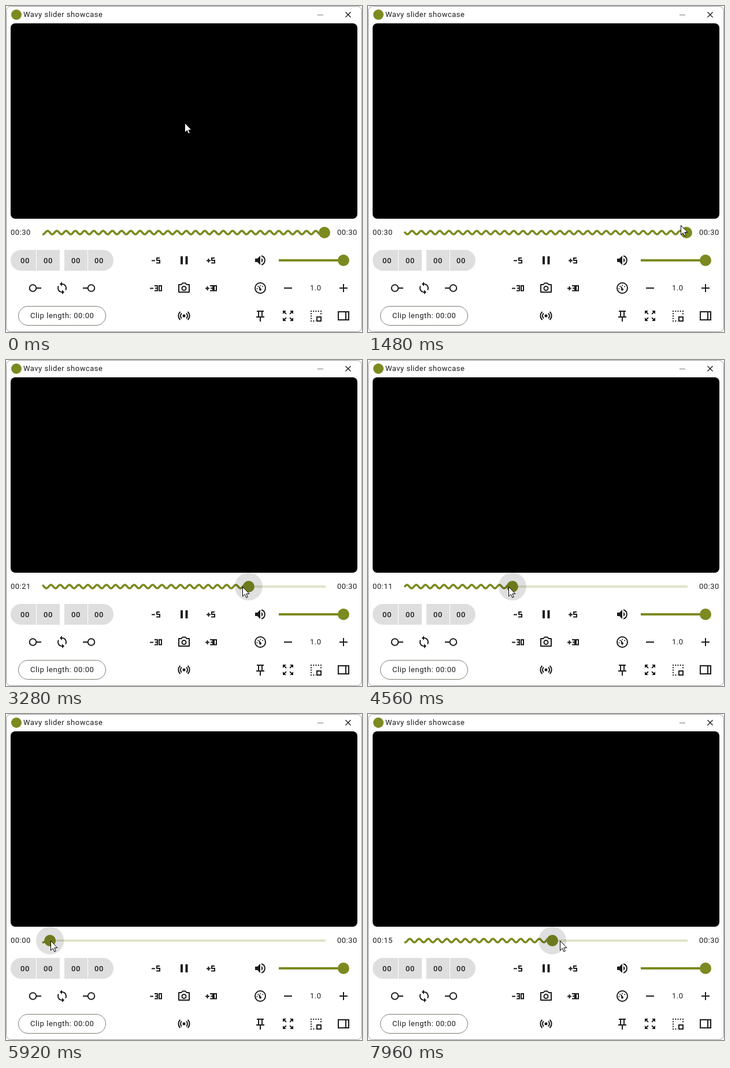
Recreate the animation shown at these times as an HTML page. Size 616 by 564 pixels, loop 8000 ms.

```html
<!DOCTYPE html>
<html lang="en">
<head>
<meta charset="utf-8">
<title>Wavy slider showcase</title>
<style>
  html, body { margin: 0; width: 100%; height: 100%; overflow: hidden; background: #fff; }
  svg { display: block; }
  text { font: 13px Roboto, sans-serif; letter-spacing: .5px; fill: #1c1c1c; }
  .chips { font-weight: 500; }
  .line { fill: none; stroke: #1c1c1c; stroke-width: 2; }
  .solid { fill: #1c1c1c; }
  .olive { fill: #7c8a20; }
  .track { fill: none; stroke: #7c8a20; stroke-width: 4; }
</style>
</head>
<body>
<svg width="616" height="564" viewBox="0 0 616 564">
  <defs>
    <path id="five" d="M6 1H1V5H6V9.5H0"/>
    <path id="three" d="M0 1H5V9.5H0M1 5.2H5"/>
    <path id="zero" d="M1 1H5V9.5H1Z"/>
    <path id="corner" class="solid" d="M3-9l2.3 2.3-2.9 2.9 1.4 1.4 2.9-2.9L9-3V-9z"/>
  </defs>

  <rect x=".5" y=".5" width="615" height="563" rx="8" fill="#fff" stroke="#9c9c9c"/>
  <circle class="olive" cx="18" cy="15" r="9"/>
  <text x="30" y="19">Wavy slider showcase</text>
  <path d="M539 15.5h10" stroke="#777"/>
  <path d="M587.5 10.5l9 9m0-9l-9 9" stroke="#111" stroke-width="1.3"/>
  <rect x="8" y="30" width="600" height="338" rx="8"/>

  <!-- Seek bar -->
  <text id="elapsed" x="8" y="396"></text>
  <text x="573" y="396">00:30</text>
  <path id="rest" class="track" stroke-opacity=".24"/>
  <path id="wave" class="track" style="stroke-width:3.6"/>
  <circle id="thumb" class="olive" cy="392" r="10"/>
  <circle id="halo" cy="392" r="24"/>

  <!-- Clip controls -->
  <path fill="#dedede" d="M93 422H26a18 18 0 0 0 0 36H93zM101 422h67a18 18 0 0 1 0 36H101z"/>
  <path d="M52.5 422v36M141.5 422v36" stroke="#fff"/>
  <g>
    <text class="chips" x="25" y="444.500">00</text>
    <text class="chips" x="65" y="444.500">00</text>
    <text class="chips" x="113" y="444.500">00</text>
    <text class="chips" x="153" y="444.500">00</text>
  </g>
  <g class="line">
    <circle cx="46.500" cy="488" r="5.800"/><path d="M52 488h9"/>
    <circle cx="147.500" cy="488" r="5.800"/><path d="M133 488h9"/>
  </g>
  <path class="solid" transform="translate(85 476)" d="M12 4V1L8 5l4 4V6c3.310 0 6 2.690 6 6 0 1.010-.25 1.970-.7 2.800l1.460 1.460C19.540 15.030 20 13.570 20 12c0-4.420-3.580-8-8-8zm0 14c-3.310 0-6-2.690-6-6 0-1.010.25-1.970.7-2.800L5.240 7.740C4.460 8.970 4 10.430 4 12c0 4.420 3.580 8 8 8v3l4-4-4-4v3z"/>
  <rect x="21.500" y="519.500" width="151" height="33" rx="16.500" fill="none" stroke="#7b7b72"/>
  <text x="42" y="540" style="letter-spacing:.58px">Clip length: 00:00</text>

  <!-- Playback controls -->
  <g class="line">
    <path d="M252 440.500h6M347 440.500h7M350.500 437v7M249 488.500h6M345 488.500h7M348.500 485v7"/>
    <use href="#five" x="260" y="435"/><use href="#five" x="355" y="435"/>
    <use href="#three" x="257" y="483"/><use href="#zero" x="264" y="483"/>
    <use href="#three" x="353" y="483"/><use href="#zero" x="359" y="483"/>
    <path d="M299 482h4.500l2-2.500h5l2 2.500h4.500V495H299z" stroke-linejoin="round"/>
    <circle cx="308" cy="488.500" r="3.500"/>
    <path d="M304 531.500a6 6 0 0 0 0 9M312 531.500a6 6 0 0 1 0 9M301.500 529a9.500 9.500 0 0 0 0 14M314.500 529a9.500 9.500 0 0 1 0 14"/>
  </g>
  <path class="solid" d="M302 433h4v14h-4zM310.500 433h4v14h-4z"/>
  <circle class="solid" cx="308" cy="536" r="2.500"/>

  <!-- Volume and speed -->
  <path class="solid" d="M431 437v6h4l5 5v-16l-5 5zM442 436v8a4.500 4.500 0 0 0 0-8z"/>
  <path class="line" d="M442 432.300a8 8 0 0 1 0 15.400"/>
  <path class="track" d="M472 440H584" stroke-linecap="butt"/>
  <circle class="olive" cx="584" cy="440" r="10"/>
  <g class="line">
    <circle cx="440" cy="488" r="9"/>
    <path d="M440 490l-2-4.500M481 488h14M577 488h14M584 481v14"/>
    <path d="M434.500 489a5.500 5.500 0 0 1 11 0" stroke-dasharray="0 4.320" stroke-linecap="round"/>
  </g>
  <circle class="solid" cx="440" cy="490.500" r="2"/>
  <text x="526" y="492">1.0</text>

  <!-- Window controls -->
  <g class="line">
    <path d="M434 528h12M437 528v9M443 528v9M433 538h14M440 538v8"/>
    <path d="M527 528H546M528 527V546M545 527V534M527 545H536" stroke-dasharray="2 2.250"/>
    <path d="M538 538h7v7h-7zM575 529h18v14h-18zM588 529v14"/>
  </g>
  <g transform="translate(488 536)">
    <use href="#corner"/>
    <use href="#corner" transform="rotate(90)"/>
    <use href="#corner" transform="rotate(180)"/>
    <use href="#corner" transform="rotate(270)"/>
  </g>

  <path id="cursor" fill="#fff" stroke="#000" d="M0 0V16.500L3.800 12.900 6.300 18.600 8.800 17.500 6.400 12H11.500Z"/>
</svg>

<script>
  const LOOP = 8000, START = 63, END = 553, MAX = 551, MID = 392, TAU = 2 * Math.PI;
  const APPROACH = 430, PRESS = 1697;

  // Keyframes are [time in ms, x].
  const thumbKeys = [[2170, MAX], [3280, 420], [4560, 250], [5890, 75], [5920, 76], [6800, 177], [7960, 319]];
  const cursorKeys = [[PRESS, 558], [2130, 555], [3280, 409], [4560, 243], [5890, 75], [5920, 77], [6800, 186], [7960, 332]];

  const el = id => document.getElementById(id);
  const [elapsed, rest, wave, thumb, halo, cursor] =
    ['elapsed', 'rest', 'wave', 'thumb', 'halo', 'cursor'].map(el);
  const clamp = v => Math.max(0, Math.min(1, v));
  const mix = (a, b, p) => a + (b - a) * p;

  function along(keys, t) {
    if (t <= keys[0][0]) return keys[0][1];
    const i = keys.findIndex(k => k[0] >= t);
    if (i < 0) return keys[keys.length - 1][1];
    const [t0, x0] = keys[i - 1], [t1, x1] = keys[i];
    return mix(x0, x1, (t - t0) / (t1 - t0));
  }

  function wavePath(end, t) {
    let d = '';
    for (let x = START; x <= end; x++) {
      const y = MID - 3 * Math.cos(TAU * ((x - 72) / 16 + t / 2000));
      d += (d ? 'L' : 'M') + x + ' ' + y.toFixed(2);
    }
    return d;
  }

  function draw(t) {
    const x = along(thumbKeys, t);
    const seconds = Math.floor((x - 63.5) / (MAX - 63.5) * 30);
    elapsed.textContent = '00:' + String(Math.max(0, seconds)).padStart(2, '0');
    wave.setAttribute('d', wavePath(x, t));
    rest.setAttribute('d', `M${x} ${MID}H${Math.max(x, END)}`);
    thumb.setAttribute('cx', x);
    halo.setAttribute('cx', x);
    halo.setAttribute('fill-opacity', .12 * clamp((t - PRESS) / 100));

    const ease = (1 - Math.cos(Math.PI * clamp((t - APPROACH) / (PRESS - APPROACH)))) / 2;
    const cx = t < PRESS ? mix(309, 558, ease) : along(cursorKeys, t);
    cursor.setAttribute('transform', `translate(${Math.round(cx) + .5} ${Math.round(mix(202, MID, ease)) + .5})`);
  }

  const origin = performance.now();
  function tick() {
    draw((performance.now() - origin) % LOOP);
    requestAnimationFrame(tick);
  }
  tick();
</script>
</body>
</html>
```
